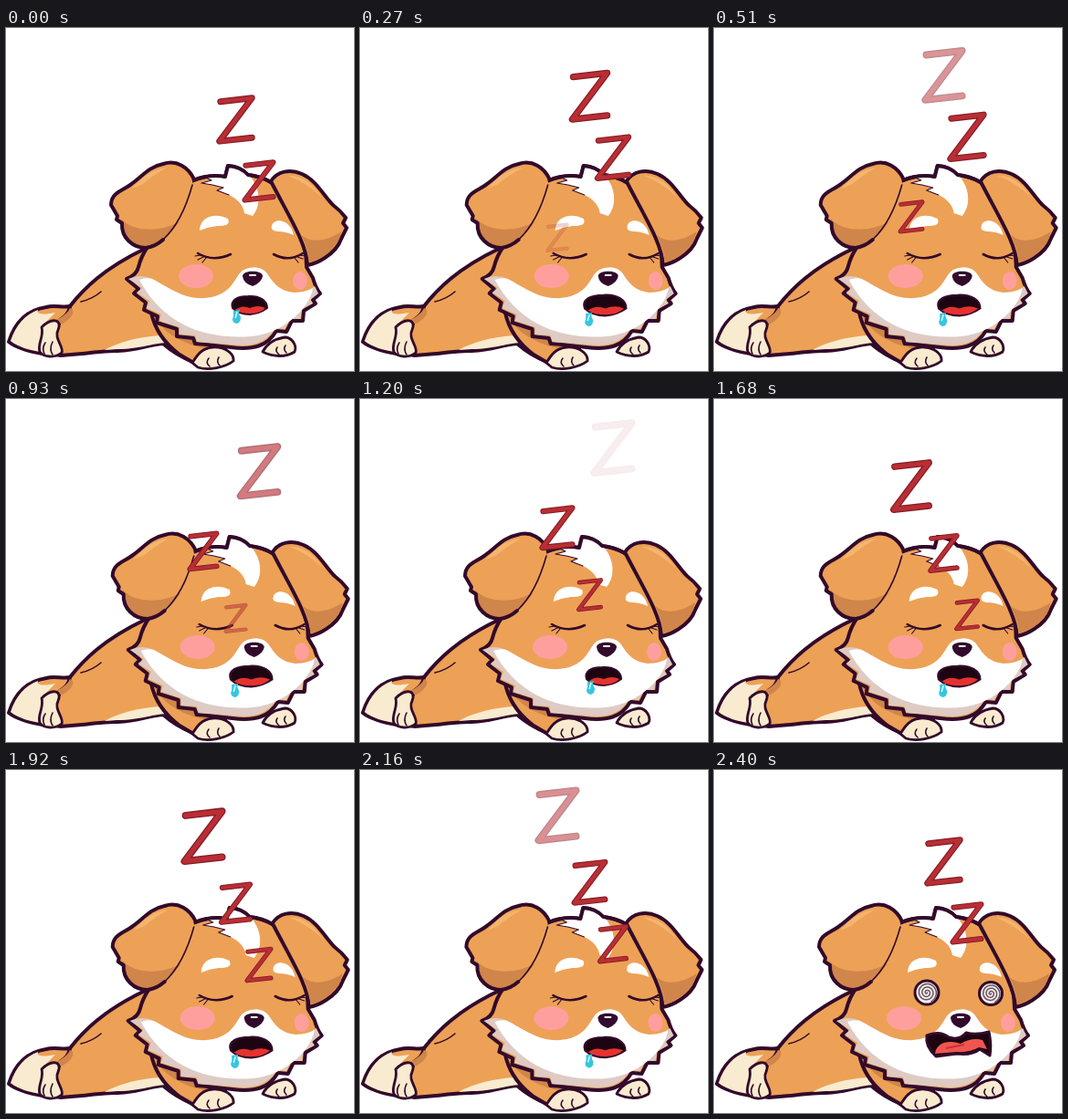
An HTML page for the animation above (2430 ms loop, 381 by 376 pixels).

```html
<!DOCTYPE html>
<html lang="en">
<head>
<meta charset="utf-8">
<title>Sleeping puppy</title>
<style>
  html, body { margin: 0; width: 100%; height: 100%; overflow: hidden; background: #fff; }
  svg { display: block; width: 100vw; height: 100vh; }
  .line { fill: none; }
  .line, .fur, .cream { stroke: #320a2b; stroke-width: 4; stroke-linejoin: round; stroke-linecap: round; }
  .fur { fill: #eda156; }
  .cream { fill: #f9ebcf; }
  .shade { fill: #d0854a; }
  .thin { stroke-width: 1.6; }
  .mid { stroke-width: 2.8; }
  .blush { fill: #ff9f9d; }
  .z path { fill: none; stroke-linejoin: round; stroke-linecap: round; }
</style>
</head>
<body>
<svg viewBox="0 0 381 376">
  <!-- body and tail -->
  <path class="fur" d="M70 305C84 287 106 264 152 242L230 300L240 352L205 366C192 361 181 354 172 346C152 348 147 353 122 354C106 353 95 357 60 359L42 356L66 308Z"/>
  <path fill="#f9ebcf" d="M108 353C122 345 142 339 168 337L176 345C158 346 146 352 122 352Z"/>
  <path class="fur" d="M3 344C10 322 24 309 44 306C53 303 62 307 70 305C69 316 58 320 45 330L40 357C28 355 13 352 3 344Z"/>
  <path fill="#f9ebcf" d="M5 343C11 325 21 314 35 309C33 315 44 314 54 312L41 325L38 355C25 353 14 350 5 343Z"/>
  <path class="shade" d="M70 307C67 315 56 319 48 324L62 324C73 318 77 309 70 307Z"/>
  <path class="cream mid" d="M39 328C50 317 62 319 57 331C52 340 64 350 61 356C54 362 41 361 37 355C34 346 42 338 39 328Z"/>
  <path class="line thin" d="M43 345Q39 351 42 357M51 344Q47 352 51 358M82 300Q95 297 104 289"/>
  <!-- front legs -->
  <path class="fur" d="M159 312C163 331 174 346 190 358L207 368L240 350L187 326Z"/>
  <path class="shade" d="M161 314C181 334 206 340 242 351L222 352C194 347 172 335 161 314Z"/>
  <path class="cream mid" d="M204 367C209 359 214 351 226 350C240 349 250 357 249 365C240 372 222 376 210 372Z"/>
  <path class="line thin" d="M222 362Q218 367 223 371M233 361Q230 366 234 370"/>
  <path class="cream mid" d="M281 355C285 347 293 341 305 339C313 339 319 348 316 355C307 361 293 361 281 355Z"/>
  <path class="line thin" d="M297 350Q294 354 299 358M306 348Q303 352 307 356"/>
  <g id="head">
    <path class="fur" d="M203 168Q220 160 240 163L243 151Q257 152 265 161Q292 164 307 185Q328 214 329 262L336 274Q339 285 344 291L336 298L339 302L326 310L325 321L313 321L307 333L296 332C286 349 271 353 246 350Q221 347 207 346L205 340L187 338L187 330L165 323L166 316L151 309L153 301L140 291L145 286L132 275Q143 271 145 262Q148 250 155 240Q188 222 203 168Z"/>
    <path fill="#decbc4" d="M134 275Q147 269 160 275C179 285 195 298 218 296C243 294 249 279 255 270C260 262 277 259 285 268C291 276 296 288 315 290Q330 290 338 283L342 291L333 298L336 302L324 308L322 319L311 319L305 330L295 329C284 346 270 350 246 347L209 344L207 337L190 336L190 328L168 321L170 314L154 307L157 299L143 290L149 285Z"/>
    <path fill="#fff" d="M146 276Q154 273 160 275C179 285 195 298 218 296C243 294 249 279 255 270C260 262 277 259 285 268C291 276 296 288 315 290Q328 290 336 285C334 303 308 334 269 338C218 342 172 325 146 276Z"/>
    <!-- tuft -->
    <path fill="#fff" d="M214 170L225 167L219 164Q230 161 240 165L243 152Q263 153 271 168C279 181 278 197 270 206L261 203Q259 190 244 183L231 178L238 175L226 172Z"/>
    <path class="line" style="stroke-width:1.2" d="M244 183L231 178L238 175L226 172L214 170L225 167L219 164"/>
    <path class="line" d="M205 167Q222 160 240 163L243 151Q257 152 265 161Q280 163 290 169"/>
    <!-- ears -->
    <path class="fur" style="stroke:none" d="M204 168C202 153 187 144 172 149C156 152 148 164 136 172C126 179 115 181 115 194L122 206L121 210L127 214C126 230 139 241 153 241C178 237 198 202 205 174Z"/>
    <path class="shade" d="M126 209C137 223 169 225 190 212C178 230 165 240 153 240C139 239 128 229 126 209Z"/>
    <path fill="#f4b56e" d="M138 176Q155 155 176 153Q160 162 150 171Z"/>
    <path class="line" d="M206 166C200 153 187 144 172 149C156 152 148 164 136 172C126 179 115 181 115 194L122 206L121 210L127 214C126 230 139 241 153 241Q163 240 172 232"/>
    <path class="line thin" d="M172 232C188 217 198 194 204 172"/>
    <path class="fur" d="M290 168C297 157 311 154 324 160C340 167 347 183 358 194Q366 200 372 208L369 214L373 219L367 231Q363 243 349 252Q340 258 330 260C329 236 310 207 290 168Z"/>
    <path class="shade" d="M323 227C336 237 352 233 367 223L365 231Q360 242 348 250Q340 255 332 257C331 245 328 236 323 227Z"/>
    <path fill="#f4b56e" d="M309 162Q330 161 345 185Q328 169 309 162Z"/>
    <!-- face -->
    <path fill="#fff" d="M212 221C213 206 230 202 243 209C246 216 240 217 231 217Q221 218 212 222ZM291 217C292 208 311 208 315 227Q306 223 297 223Q289 222 291 217Z"/>
    <ellipse class="blush" cx="208" cy="272" rx="19" ry="13"/>
    <ellipse class="blush" cx="322" cy="277" rx="8" ry="10"/>
    <path fill="#320a2b" d="M259 272C259 265 281 265 281 272Q280 279 270 283Q260 280 259 272Z"/>
    <path stroke="#fff" stroke-width="2" stroke-linecap="round" d="M267 271H273"/>
    <g id="asleep">
      <path class="line" style="stroke-width:2.6" d="M210 247Q227 257 246 248M293 248Q309 257 325 247"/>
      <path class="line" style="stroke-width:1.2" d="M213 249L207 250M216 251L210 254M219 252L215 257M319 251L325 253M322 249L328 250M316 252L320 257"/>
      <g id="yawn">
        <path fill="#1c0510" stroke="#320a2b" stroke-width="2" d="M248 307C245 298 254 294 265 294C278 293 286 299 286 307Q278 313 267 314Q255 314 248 307Z"/>
        <path fill="#e6322f" d="M251 309Q258 303 267 307Q276 303 284 307Q278 313 267 313Q257 313 251 309Z"/>
      </g>
      <g id="drool">
        <path fill="#35c6df" d="M249 310L256 309Q254 313 257 317Q257 324 252 324Q246 322 249 316Z"/>
        <path fill="none" stroke="#c9f8fc" stroke-width="1.6" d="M253 311L251 318"/>
      </g>
    </g>
    <g id="awake">
      <path fill="#1c0510" stroke="#320a2b" stroke-width="3" stroke-linejoin="round" d="M233 291Q247 285 257 293Q269 297 276 288Q287 291 301 287Q304 301 302 313L291 306Q282 313 266 311L243 314Q231 303 233 291Z"/>
      <path fill="#f0564f" d="M242 311C243 299 257 295 270 300Q282 293 294 296L299 306L290 304Q280 310 266 309Z"/>
      <path fill="none" stroke="#c83237" stroke-width="2" d="M254 305L274 301"/>
      <g id="spirals"></g>
    </g>
  </g>
  <g id="zs"></g>
</svg>
<script>
// The sleep cycle lasts CYCLE ms, then the startled face flashes until LOOP.
const LOOP = 2430, CYCLE = 2400, RISE = 0.0952;
const byId = id => document.getElementById(id);
const clamp = v => Math.max(0, Math.min(1, v));
const show = (id, on) => byId(id).setAttribute('visibility', on ? 'visible' : 'hidden');
const place = (node, transform) => node.setAttribute('transform', transform);

// Each Z: x, y and width at its reference time, growth per ms, fade-in start/end, fade-out start/end.
const letters = [
  { x: 251.5, y: 240.5, w: 26, at: 930, grow: .0112, fade: [800, 1060, 2720, 3110] },
  { x: 277, y: 236.5, w: 28, at: 1680, grow: .0124, fade: [1360, 1620, 3150, 3640] },
  { x: 216, y: 207, w: 29, at: 510, grow: .0145, fade: [220, 460, 1990, 2350] }
];
const zPath = 'M-17 -20L18 -24L-18 24L18 20';
byId('zs').innerHTML = letters.map(() =>
  `<g class="z"><path d="${zPath}" stroke="#861d28" stroke-width="7"/><path d="${zPath}" stroke="#b92e34" stroke-width="4.6"/></g>`
).join('');

function spiral(cx, cy, r) {
  let d = '';
  for (let a = 0; a <= 20; a += .25) {
    const k = a / 20 * (r - 2);
    d += `${a ? 'L' : 'M'}${(cx + k * Math.cos(a)).toFixed(1)} ${(cy + k * Math.sin(a)).toFixed(1)}`;
  }
  return `<circle cx="${cx}" cy="${cy}" r="${r}" fill="#f4eeee" stroke="#320a2b" stroke-width="3"/>
    <path d="${d}" fill="none" stroke="#69545f" stroke-width="1.5"/>`;
}
byId('spirals').innerHTML = spiral(233, 244, 13) + spiral(303, 245, 12.5);

function drawLetter(node, z, time) {
  const [a, b, c, d] = z.fade;
  const t = time < a ? time + CYCLE : time;
  const dt = t - z.at;
  const size = Math.min(49, z.w + z.grow * dt) / 43;
  place(node, `translate(${z.x} ${z.y - RISE * dt}) scale(${size})`);
  node.setAttribute('opacity', clamp((t - a) / (b - a)) * clamp((d - t) / (d - c)));
}

function draw(now) {
  const t = now % LOOP;
  const startled = t >= CYCLE;
  const phase = t % CYCLE;
  const open = clamp(1.2 * (1 - Math.cos(phase / CYCLE * 4 * Math.PI)));
  show('asleep', !startled);
  show('awake', startled);
  place(byId('head'), `translate(${1.7 * open} 0)`);
  place(byId('yawn'), `translate(267 303.5) scale(${1 + .19 * open} ${1 + .13 * open}) translate(-267 -303.5)`);
  place(byId('drool'), `translate(${-3.5 * open} ${3 * open})`);
  letters.forEach((z, i) => drawLetter(byId('zs').children[i], z, phase));
  requestAnimationFrame(() => draw(performance.now() - start));
}
const start = performance.now();
draw(0);
</script>
</body>
</html>
```
